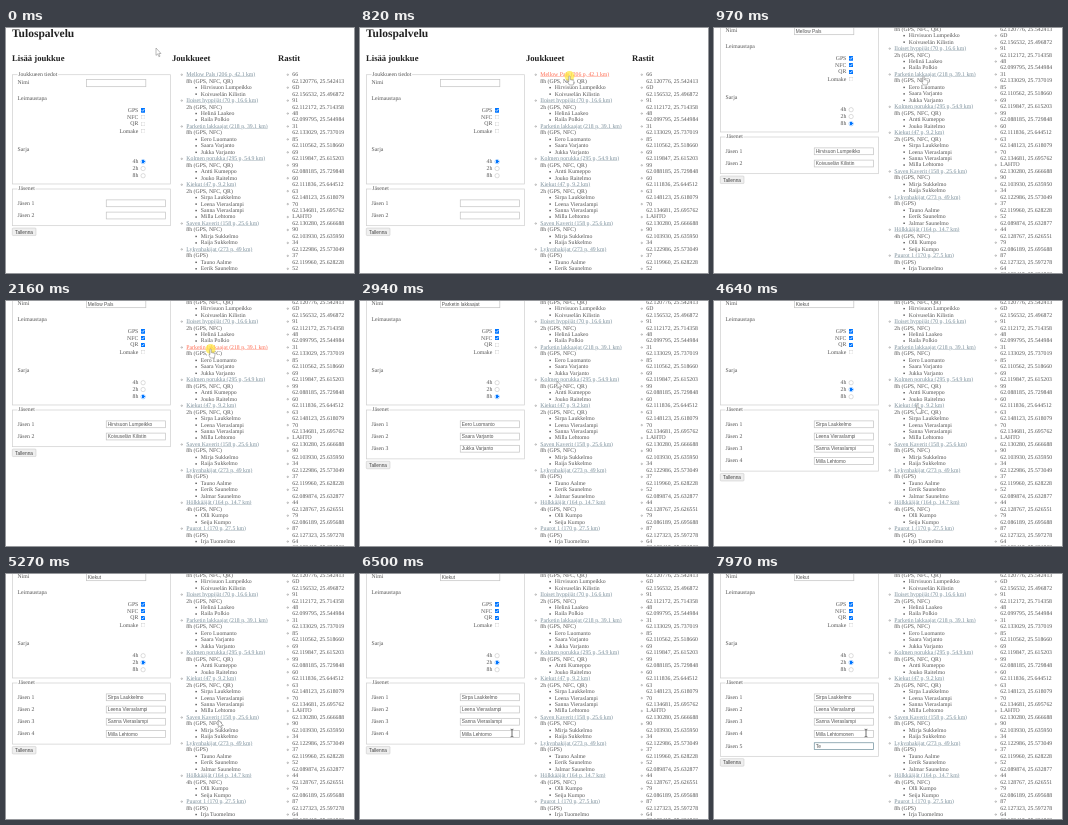
Animation of 348 by 245 pixels, one loop 8000 ms. Source, as an HTML page:

```html
<!DOCTYPE html>
<html lang="fi">
<head>
<meta charset="utf-8">
<title>Tulospalvelu</title>
<style>
  html, body { margin: 0; width: 100%; height: 100%; overflow: hidden; background: #fff; }
  #stage { position: absolute; left: 0; top: 0; width: 348px; height: 245px; overflow: hidden; pointer-events: none; }
  #page {
    position: absolute; left: 0; top: 0; width: 968px; height: 900px; transform-origin: 0 0;
    font: 16px/18px "Liberation Serif", "Times New Roman", serif; color: #555; text-rendering: geometricPrecision;
  }
  #page > * { position: absolute; margin: 0; white-space: nowrap; box-sizing: border-box; }
  .mid { transform: translateY(-50%); }
  .right { transform: translate(-100%, -50%); }
  h1, h2 { color: #222; }
  h1 { font-size: 32px; line-height: 37px; }
  h2 { font-size: 24px; line-height: 28px; }
  ul { padding: 0 0 0 40px; margin: 0; list-style: circle; }
  ul ul { list-style: square; }
  a { color: #7b8f9b; text-decoration: underline; }
  .frame { border: 2px solid #d0d0d0; }
  .legend { background: #fff; padding: 0 2px; }
  input, button { font: 13.33px "Liberation Sans", Arial, sans-serif; }
  input[type=text] { width: 167px; height: 21.5px; padding: 1px 3px; border: 2px solid #c4c4c4; background: #fff; color: #555; }
  #page > input.focus { border-color: #6f8f9c; }
  input[type=checkbox], input[type=radio] { width: 13px; height: 13px; }
  input[type=radio] { appearance: none; border: 1.5px solid #a0a0a0; border-radius: 50%; background: #fff; }
  input[type=radio]:checked { border-color: #0075ff; background: radial-gradient(#0075ff 50%, #fff 56%); }
  button { width: 67px; height: 22px; padding: 0; border: 1px solid #b0b0b0; border-radius: 3px; background: #efefef; color: #444; }
  svg { position: absolute; left: 0; top: 0; }
</style>
</head>
<body>
<div id="stage">
  <div id="page"></div>
  <svg width="348" height="245" viewBox="0 0 348 245">
    <g id="cursor" stroke="#777" stroke-width=".5" stroke-linejoin="round" fill="#fff">
      <circle id="press" r="5" fill="#ffe83a" fill-opacity=".7" stroke="none"/>
      <path id="arrow" d="M0 0V7.4L1.7 5.9 2.9 8.7 4 8.2 2.8 5.5H5Z"/>
      <path id="hand" d="M-.7 .5Q0-.3 .7 .5V3.6L3.9 4.3Q4.5 4.6 4.4 5.6L3.7 9H-.2L-1.7 6Q-1.8 5-.7 5.6Z"/>
      <path id="beam" d="M-1.4-3.8Q0-3.8 0-3 0-3.8 1.4-3.8M0-3V3M-1.4 3.8Q0 3.8 0 3 0 3.8 1.4 3.8" fill="none" stroke="#333" stroke-width=".7"/>
    </g>
  </svg>
</div>
<script>
const LOOP = 8000, SCALE = 0.3594, SCROLL = 52, ROW = 12.2;

const teams = [
  ["Mellow Pals", "206 p, 42.1 km", "8h", "GPS, NFC, QR", "Hirvisuon Lumpeikko", "Koivuselän Kilistin"],
  ["Iloiset hyppijät", "70 p, 16.6 km", "2h", "GPS, NFC", "Helinä Laakeo", "Raila Polkio"],
  ["Parketin lakkaajat", "218 p, 39.1 km", "8h", "GPS, NFC", "Eero Luomanto", "Saara Varjanto", "Jukka Varjanto"],
  ["Kolmen porukka", "295 p, 54.9 km", "8h", "GPS, NFC, QR", "Antti Kumeppo", "Jouko Raitelmo"],
  ["Kiekut", "47 p, 9.2 km", "2h", "GPS, NFC, QR", "Sirpa Laukkelmo", "Leena Vieraslampi", "Sanna Vieraslampi", "Milla Lehtomo"],
  ["Saven Kaverit", "158 p, 25.6 km", "8h", "GPS, NFC", "Mirja Sukkelmo", "Raija Sukkelmo"],
  ["Lykynhakijat", "273 p, 49 km", "8h", "GPS", "Tauno Aalme", "Eerik Saunelmo", "Jalmar Saunelmo"],
  ["Hölkkääjät", "164 p, 14.7 km", "4h", "GPS, NFC", "Olli Kumpo", "Seija Kumpo"],
  ["Puurot 1", "170 p, 27.5 km", "8h", "GPS", "Irja Tuomelmo"],
].map(([name, stats, series, stamps, ...members]) => ({ name, stats, series, stamps, members }));
const blank = { name: "", series: "4h", stamps: "GPS", members: ["", ""] };

const controls = `66 62.120776, 25.542413
6D 62.156532, 25.496872
91 62.112172, 25.714358
48 62.099795, 25.544984
31 62.133029, 25.737019
85 62.110562, 25.518660
69 62.119847, 25.615203
99 62.088185, 25.729848
60 62.111836, 25.644512
63 62.148123, 25.618079
70 62.134681, 25.695762
LAHTO 62.130280, 25.666688
90 62.103930, 25.635950
34 62.122986, 25.573049
37 62.119960, 25.628228
52 62.089874, 25.632877
44 62.128767, 25.626551
79 62.086189, 25.695688
87 62.127323, 25.597278
64 62.109415, 25.601862`.split("\n");

const $ = id => document.getElementById(id);
const page = $("page");

// Coordinates are stage pixels; the page itself is laid out at full size.
function put(tag, x, y, cls = "mid", props = {}) {
  const el = Object.assign(document.createElement(tag), props);
  el.className = cls;
  el.style.left = x / SCALE + "px";
  el.style.top = y / SCALE + "px";
  return page.appendChild(el);
}
const text = (s, x, y, cls) => put("span", x, y, cls, { textContent: s });
const field = (type, x, y) => put("input", x, y, "mid", { type, tabIndex: -1 });
function frame(y, bottom) {
  const el = put("div", 6, y, "frame");
  el.style.width = 159 / SCALE + "px";
  el.style.height = (bottom - y) / SCALE + "px";
  return el;
}
const option = type => (label, x, y) => {
  text(label, 132.3, y, "right");
  return { label, input: field(type, x, y) };
};

put("h1", 6, 5.5, "mid", { textContent: "Tulospalvelu" });
[["Lisää joukkue", 6], ["Joukkueet", 166], ["Rastit", 272]]
  .forEach(([s, x]) => put("h2", x, 30.5, "mid", { textContent: s }));

frame(46.3, 156.2);
text("Joukkueen tiedot", 11.5, 46.5, "mid legend");
text("Nimi", 11.5, 55);
text("Leimaustapa", 11.5, 70.5);
text("Sarja", 11.5, 121.7);
const nameField = field("text", 80, 55);
const stampBoxes = ["GPS", "NFC", "QR", "Lomake"].map((s, i) => option("checkbox")(s, 134.8, 82.2 + 6.95 * i));
const seriesDots = ["4h", "2h", "8h"].map((s, i) => option("radio")(s, 134.8, 133.6 + 7.1 * i));

const MEMBERS_TOP = 160.8;
const memberFrame = frame(MEMBERS_TOP, 198);
text("Jäsenet", 11.5, 161, "mid legend");
const rows = [0, 1, 2, 3, 4].map(i => {
  const y = 175.3 + ROW * i;
  return { label: text(`Jäsen ${i + 1}`, 11.5, y), input: field("text", 100, y) };
});
const save = put("button", 6, 204, "mid", { textContent: "Tallenna", tabIndex: -1 });

const LIST_TOP = 43.4;
put("ul", 166, LIST_TOP, "", {
  innerHTML: teams.map(t => `<li><a>${t.name} (${t.stats})</a><br>${t.series} (${t.stamps})<ul>` +
    t.members.map(m => `<li>${m}</li>`).join("") + "</ul></li>").join("")
});
put("ul", 272, LIST_TOP, "", { innerHTML: controls.map(c => `<li>${c.replace(" ", "<br>")}</li>`).join("") });
const links = [...page.querySelectorAll("a")];

// Pointer moves: start, end, number of steps, destination
const moves = [
  [270, 820, 8, 209.5, 48], [1300, 1430, 3, 205, 48.3], [1680, 1680, 1, 204.6, 48],
  [2780, 2940, 3, 197, 80], [3170, 3700, 8, 203, 102],
  [4640, 5270, 9, 212.3, 146], [5880, 6500, 10, 152, 159],
];
const shapes = [[0, "arrow"], [700, "hand"], [2780, "arrow"], [3550, "hand"], [4700, "arrow"], [6200, "beam"]];
const forms = [[0, blank], [970, teams[0]], [2300, teams[2]], [4160, teams[4]]];
const presses = [[820, 970, 0], [1830, 2300, 2], [3930, 4160, 4]];
const suffixes = [[0, ""], [7120, "n"], [7190, "nen"]];
const newNames = [[0, ""], [7900, "T"], [7970, "Te"]];
const focuses = [[0, -1], [6660, 3], [7600, 4]];

const latest = (table, t) => table.filter(([at]) => t >= at).pop()[1];

function pointer(t) {
  let x = 150, y = 20;
  for (const [start, end, steps, toX, toY] of moves) {
    if (t < start) break;
    const gap = (end - start) / Math.max(1, steps - 1);
    const done = t >= end ? 1 : (Math.floor((t - start) / gap) + 1) / steps;
    const k = (1 - Math.cos(Math.PI * done)) / 2;
    x += (toX - x) * k;
    y += (toY - y) * k;
  }
  return [x, y];
}

function drawForm(t) {
  const team = latest(forms, t), focus = latest(focuses, t);
  const members = [...team.members];
  if (t >= 7120) {
    members[3] += latest(suffixes, t);
    members.push(latest(newNames, t));
  }
  nameField.value = team.name;
  const stamps = team.stamps.split(", ");
  stampBoxes.forEach(o => o.input.checked = stamps.includes(o.label));
  seriesDots.forEach(o => o.input.checked = o.label === team.series);
  rows.forEach(({ label, input }, i) => {
    label.hidden = input.hidden = i >= members.length;
    input.value = members[i] || "";
    input.classList.toggle("focus", i === focus);
  });
  const bottom = 185.8 + ROW * (members.length - 1);
  memberFrame.style.height = (bottom - MEMBERS_TOP) / SCALE + "px";
  save.style.top = (bottom + 5.9) / SCALE + "px";
}

function render(t) {
  drawForm(t);
  page.style.transform = `translateY(${t < 970 ? 0 : -SCROLL}px) scale(${SCALE})`;

  const press = presses.find(([from, to]) => t >= from && t < to);
  links.forEach((a, i) => a.style.color = press && press[2] === i ? "#ff6a50" : "");
  $("press").style.display = press ? "" : "none";

  const shape = latest(shapes, t);
  for (const id of ["arrow", "hand", "beam"]) $(id).style.display = id === shape ? "" : "none";
  $("cursor").setAttribute("transform", `translate(${pointer(t)})`);
}

const begin = performance.now();
function tick() {
  render((performance.now() - begin) % LOOP);
  requestAnimationFrame(tick);
}
tick();
</script>
</body>
</html>
```
